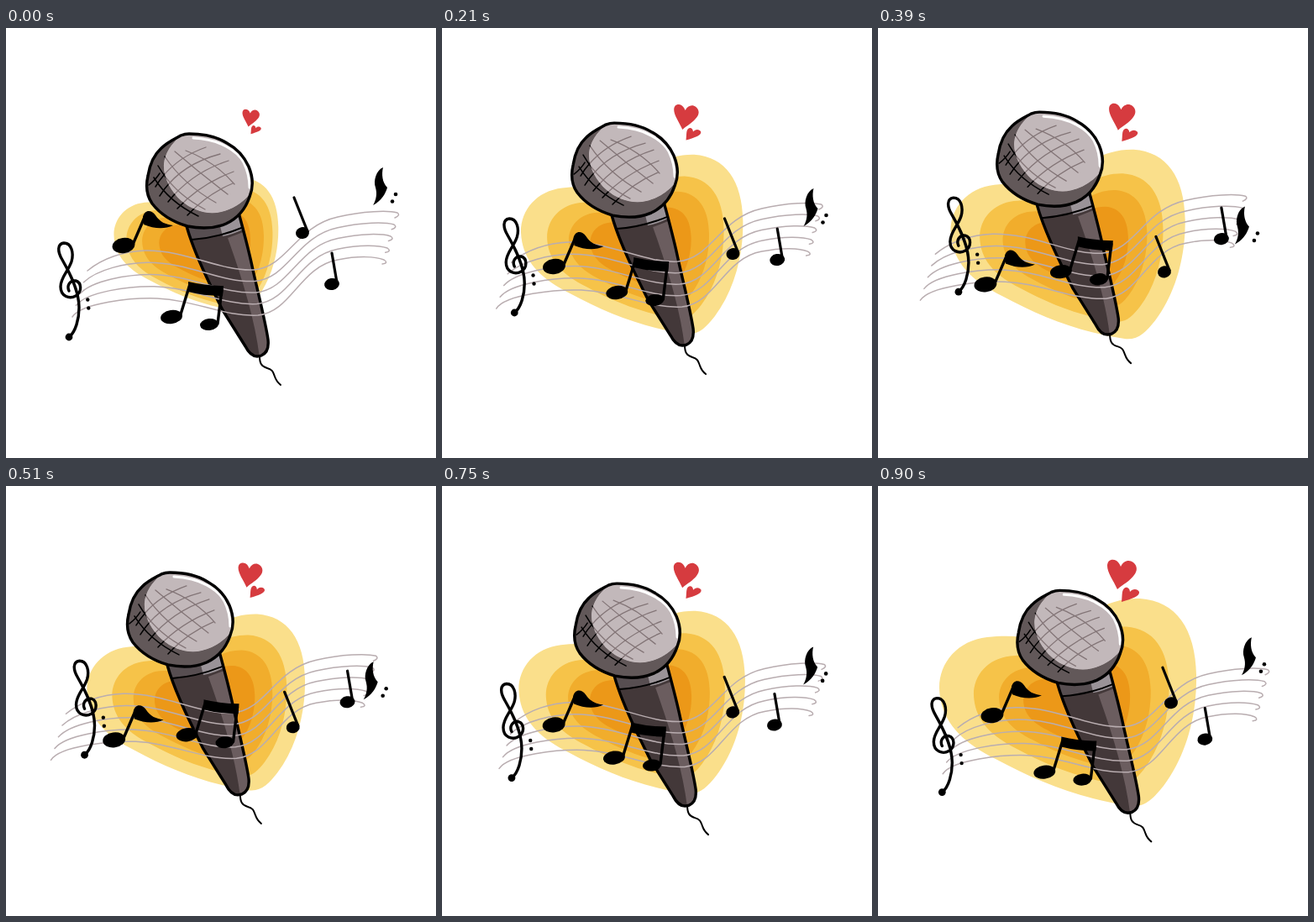
These frames come from a looping animation (512x512 px, 0.93 s). An HTML page:

```html
<!DOCTYPE html>
<html lang="en">
<head>
<meta charset="utf-8">
<title>Microphone and notes</title>
<style>
  html, body { margin: 0; width: 100%; height: 100%; overflow: hidden; background: #fff; }
  svg { display: block; width: 100vw; height: 100vh; }
  .line { fill: none; stroke: #000; stroke-linecap: round; stroke-linejoin: round; }
</style>
</head>
<body>
<svg viewBox="0 0 512 512">
  <defs>
    <path id="blob" d="M215 190C195 182 165 176 130 180C95 184 73 210 73 240C74 280 100 305 140 325C190 352 240 372 300 381C318 383 328 372 340 357C368 320 380 270 379 225C378 170 355 137 312 134C275 133 240 152 215 190Z"/>
    <path id="head" d="M218 126C237 126 252 130 263 137C276 144 284 154 289 165C294 177 295 189 290 201C285 216 275 227 262 233C248 239 231 239 216 236C199 231 184 222 174 209C167 199 166 189 169 176C171 163 176 151 185 143C193 135 203 131 208 128Q213 126 218 126Z"/>
    <path id="light" d="M207 129C197 138 189 149 188 162C187 178 196 194 209 206C222 217 240 223 256 219C269 216 281 209 290 198L300 180L280 130L218 120Z"/>
    <path id="body" d="M215 236C224 268 243 306 258 336L285 379C290 389 296 393 304 390C311 387 313 380 312 371C309 350 300 315 294 288C289 264 283 242 277 220Z"/>
    <path id="mesh" d="M178 189Q198 156 238 142M183 200Q206 163 255 150M193 207Q221 172 265 158M204 215Q231 186 271 171M216 223Q239 198 270 185M214 146Q249 159 272 186M201 147Q231 173 264 198M189 153Q211 186 250 208M181 164Q200 197 237 216M176 178Q194 207 229 224M170 187Q178 181 183 173"/>
    <clipPath id="inHead"><use href="#head"/></clipPath>
    <clipPath id="inLight"><use href="#light"/></clipPath>
    <clipPath id="inBody"><use href="#body"/></clipPath>
  </defs>

  <g id="glow"></g>

  <g id="hearts" fill="#d63b3f">
    <path d="M285 123C280 112 273 103 273 95C273 88 279 86 284 89C287 91 288 94 289 96C292 89 299 87 304 91C309 95 309 101 305 106C300 113 292 117 285 123Z"/>
    <path d="M290 138C291 130 290 125 293 122C296 119 300 122 300 126C303 122 309 122 311 126C312 131 303 134 290 138Z"/>
  </g>

  <g id="mic">
    <path class="line" stroke-width="2" d="M302 391C302 399 304 403 311 405C318 407 318 410 320 415Q322 421 327 425"/>
    <use href="#body" fill="#433839"/>
    <g clip-path="url(#inBody)">
      <path fill="#6b5d5f" d="M264 250L290 240L320 400L302 393C297 350 282 300 264 250Z"/>
      <path fill="#574e51" d="M213 238L280 222L284 237Q252 251 222 252Z"/>
      <path fill="#9a9398" d="M255 236L282 222L286 238Q270 246 258 248Z"/>
      <path class="line" stroke-width="2" d="M221 252Q252 250 283 237"/>
    </g>
    <use href="#body" class="line" stroke-width="3.4"/>
    <use href="#head" fill="#625859"/>
    <g clip-path="url(#inHead)">
      <use href="#light" fill="#c2b8ba"/>
      <use href="#mesh" class="line" stroke-width="1.5"/>
      <g clip-path="url(#inLight)">
        <use href="#light" fill="#c2b8ba"/>
        <use href="#mesh" class="line" style="stroke:#837577" stroke-width="1.3"/>
      </g>
      <path class="line" style="stroke:#fff" stroke-width="3" d="M223 131Q246 132 262 141Q277 149 283 160Q290 174 290 190"/>
    </g>
    <use href="#head" class="line" stroke-width="3.4"/>
  </g>

  <g id="staff" fill="none" stroke="#b9adb0" stroke-width="1.5" stroke-linecap="round"></g>

  <g id="up">
    <path class="line" stroke-width="3.4" d="M75 368C83 362 87 346 87 333C87 312 75 290 67 276C61 266 61 257 69 256C78 256 81 268 78 278C74 290 65 297 65 308C65 320 76 323 83 319C91 314 90 303 83 301C76 300 72 307 75 313"/>
    <circle cx="75" cy="368" r="4.4"/>
    <circle cx="97.3" cy="323.5" r="2.2"/>
    <circle cx="98.3" cy="333.5" r="2.2"/>
    <ellipse rx="13" ry="8" transform="translate(197 344) rotate(-8)"/>
    <ellipse rx="11" ry="7" transform="translate(242 353) rotate(-6)"/>
    <path class="line" stroke-width="3.4" d="M207 344L219 305M252 352L257 311"/>
    <path d="M217 302Q238 307 259 307L258 319Q236 319 217 314Z"/>
    <ellipse rx="9" ry="7" transform="translate(388 305) rotate(-10)"/>
    <path class="line" stroke-width="3.2" d="M394 303L388 268"/>
  </g>

  <g id="down">
    <ellipse rx="13.5" ry="9" transform="translate(140 259) rotate(-8)"/>
    <path class="line" stroke-width="3.4" d="M150 260L166 223"/>
    <path d="M163 225C165 216 173 216 178 223C183 231 190 234 199 235C189 240 176 239 164 234Z"/>
    <ellipse rx="8" ry="7" transform="translate(353 244) rotate(-12)"/>
    <path class="line" stroke-width="3.2" d="M359 242L343 202"/>
    <path d="M449 166C441 169 437 182 440 190C442 197 441 204 437 211C447 206 452 197 454 190C448 184 447 174 449 166Z"/>
    <circle cx="464" cy="198" r="2.3"/>
    <circle cx="460" cy="206.5" r="2.3"/>
  </g>
</svg>
<script>
const LOOP = 930, STEP = 30, TURN = 420;
const $ = id => document.getElementById(id);
const add = (parent, tag, attrs) => {
  const el = document.createElementNS("http://www.w3.org/2000/svg", tag);
  for (const k in attrs) el.setAttribute(k, attrs[k]);
  return parent.appendChild(el);
};

// Nested glow layers: colour, size at full pulse, share of the pulse, shift
const layers = [
  ["#fadf8b", 1, 1, 0, 0],
  ["#f6c349", .76, .7, 4, 4],
  ["#f1ad2c", .59, .55, 8, 5],
  ["#ec9818", .415, .4, 10, 5]
].map(([fill, size, share, dx, dy]) =>
  ({ size, share, dx, dy, el: add($("glow"), "use", { href: "#blob", fill }) }));

// Five staff lines blended between the top and the bottom one
const top5 = [97,289, 115,274, 140,266, 165,265, 215,264, 255,290, 295,288,
  335,285, 345,236, 395,225, 425,218, 455,217, 466,220, 470,223, 463,226];
const low5 = [79,344, 90,327, 150,321, 180,322, 225,324, 260,344, 300,342,
  340,338, 350,284, 395,276, 420,271, 440,272, 450,276, 456,280, 448,281];
for (let i = 0; i < 5; i++) {
  const p = top5.map((v, j) => v + (low5[j] - v) * i / 4);
  add($("staff"), "path", {
    d: `M${p.slice(0, 2)}C${p.slice(2, 26)}Q${p.slice(26)}`
  });
}

// Linear interpolation through [time, value] keys
const track = (t, keys) => {
  let i = 1;
  while (i < keys.length - 1 && t > keys[i][0]) i++;
  const [t0, a] = keys[i - 1], [t1, b] = keys[i];
  return a + (b - a) * Math.min(1, Math.max(0, (t - t0) / (t1 - t0)));
};
const move = (id, x, y) => $(id).setAttribute("transform", `translate(${x} ${y})`);
const zoom = (el, s, cx, cy, dx = 0, dy = 0) =>
  el.setAttribute("transform", `translate(${cx + dx} ${cy + dy}) scale(${s}) translate(${-cx} ${-cy})`);

function draw(t) {
  const sway = track(t, [[STEP, 0], [TURN, 1], [LOOP, 0]]);
  const rise = track(t, [[0, 0], [TURN, 1], [LOOP, 0]]);
  const pulse = track(t, [[0, .64], [300, .96], [630, .785], [LOOP, 1.024]]);

  move("mic", -28 * sway, -28 * sway);
  move("staff", -31 * sway, -21.5 * sway);
  move("up", 22.5 * rise, -58 * rise);
  move("down",
    track(t, [[0, 0], [TURN, -13], [LOOP, -3.5]]),
    track(t, [[0, 0], [TURN, 50], [LOOP, 12]]));

  for (const { el, size, share, dx, dy } of layers)
    zoom(el, size * (1 - (1 - pulse) * share), 227, 257, dx, dy);
  zoom($("hearts"), 1 - (1 - pulse) * 1.15, 293.5, 109.5);
}

const start = performance.now();
function tick() {
  const t = (performance.now() - start) % LOOP;
  draw(Math.floor(t / STEP) * STEP);
  requestAnimationFrame(tick);
}
draw(0);
requestAnimationFrame(tick);
</script>
</body>
</html>
```
